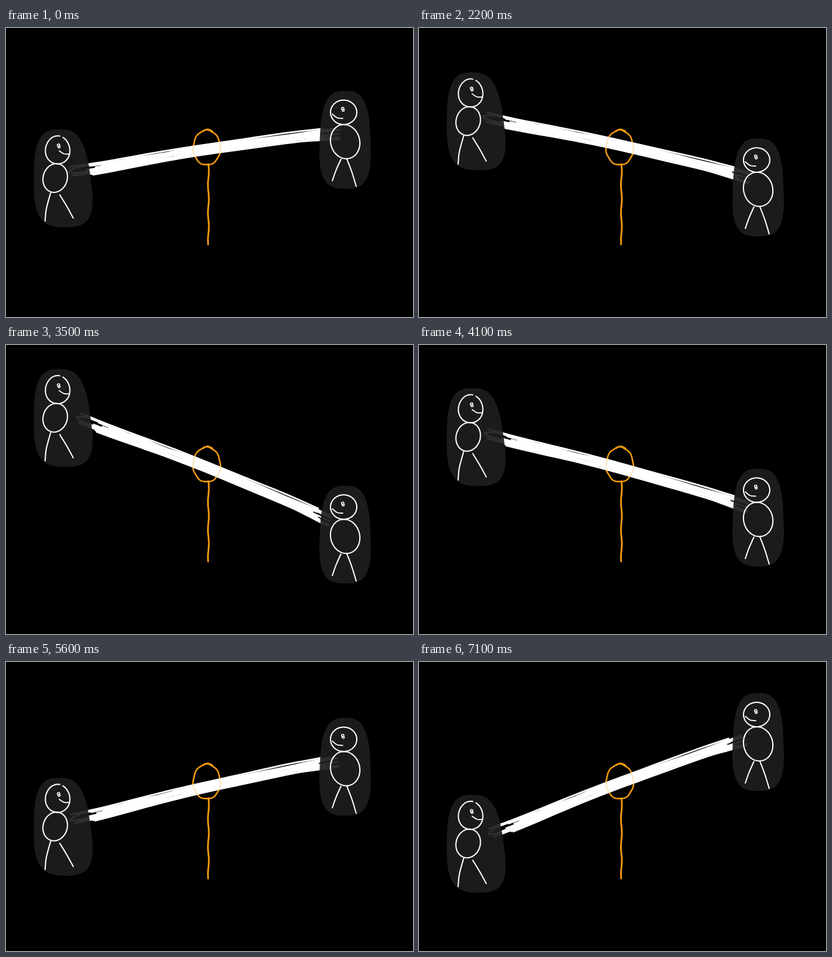
Recreate the animation shown at these times as an HTML page with a canvas. Size 666x473 px, loop 7800 ms.

```html
<!DOCTYPE html>
<html lang="en">
<head>
<meta charset="utf-8">
<title>Seesaw</title>
<style>
html, body { margin: 0; width: 100%; height: 100%; overflow: hidden; background: #000; }
canvas { display: block; }
</style>
</head>
<body>
<canvas id="stage" width="666" height="473"></canvas>
<script>
const ctx = document.getElementById('stage').getContext('2d');
const LOOP = 7800, TICK = 100;
const INK = '#fff', ORANGE = '#f79b10', SHADE = 'rgba(31,29,32,0.92)';
const PIVOT = { x: 326.5, y: 202 };

const mix = (a, b, k) => a + (b - a) * k;
const clamp = k => Math.max(0, Math.min(1, k));
const power = p => k => k ** p;
const swing = p => k => Math.sin(k ** p * Math.PI / 2);

// Tops of both figures at rest, then the phases of the ride.
// The motion rests on the ticks in PAUSES.
const REST = { left: 166, right: 103 };
const PAUSES = [12, 17, 23, 30, 38, 42, 48, 51, 52, 55, 58, 60, 66, 69, 70];
const PHASES = [
  { steps: 1, left: 164, right: 103, easeLeft: power(1), easeRight: power(1) },
  { steps: 18, left: 35, right: 234, easeLeft: swing(1), easeRight: swing(1.3) },
  { steps: 18, left: 205, right: 77, easeLeft: power(1.65), easeRight: power(1.7) },
  { steps: 9, left: 217.5, right: 51, easeLeft: power(0.9), easeRight: power(0.6) }
];

const LEFT = {
  blob: { x: 92, y: 246, rx: 46.5, ry: 80, lean: 5, taper: 0.12, square: 3 },
  head: { x: 84.5, y: 199.5, rx: 20, ry: 23, lean: 0, taper: 0.06, from: -1.1, sweep: 6 },
  body: { x: 80.5, y: 245.5, rx: 20, ry: 23.5, lean: -2 },
  eye: [86, 193],
  smile: [[87, 201], [95, 206], [104, 206]],
  legs: [[[73, 270], [66, 296], [64, 316]], [[88, 273], [99, 291], [110, 311]]]
};
const RIGHT = {
  blob: { x: 555, y: 183, rx: 41.5, ry: 80, taper: 0.08, square: 3 },
  head: { x: 552.5, y: 138, rx: 21.5, ry: 20 },
  body: { x: 555, y: 186, rx: 24, ry: 28, lean: 2 },
  eye: [551, 133],
  smile: [[534, 141], [542, 147], [551, 148]],
  legs: [[[548, 215], [540, 233], [534, 250]], [[558, 215], [566, 236], [573, 259]]]
};
const RING = { x: 328.5, y: 195.5, rx: 22.3, ry: 28.5, taper: 0.05, wobble: 0.5 };

// Oval points; square > 2 flattens the sides, taper widens the bottom
function oval({ x, y, rx, ry, lean = 0, taper = 0, square = 2, wobble = 0, from = 0, sweep = 2 * Math.PI }) {
  const bend = v => Math.sign(v) * Math.abs(v) ** (2 / square);
  return Array.from({ length: 61 }, (_, i) => {
    const a = from + sweep * i / 60, c = bend(Math.cos(a)), s = bend(Math.sin(a));
    const shake = wobble * Math.sin(7 * a);
    return [x + lean * s + (rx * (1 + taper * s) + shake) * c, y + (ry + shake) * s];
  });
}

// Smooth curve that ends in the first and last point
function trace(pts) {
  const last = pts.length - 1;
  ctx.beginPath();
  ctx.moveTo(...pts[0]);
  for (let i = 0; i < last; i++) {
    const a = pts[Math.max(0, i - 1)], b = pts[i], c = pts[i + 1], d = pts[Math.min(last, i + 2)];
    ctx.bezierCurveTo(
      b[0] + (c[0] - a[0]) / 6, b[1] + (c[1] - a[1]) / 6,
      c[0] - (d[0] - b[0]) / 6, c[1] - (d[1] - b[1]) / 6, ...c);
  }
}

function line(pts, color, width) {
  trace(pts);
  ctx.strokeStyle = color;
  ctx.lineWidth = width;
  ctx.stroke();
}

function random(seed) {
  return () => {
    seed = (seed * 16807) % 2147483647;
    return seed / 2147483647;
  };
}

// One pencil stroke along the plank; depth runs from -1 (upper edge) to 1
function strand(x0, x1, d0, d1, phase) {
  const n = 10;
  return Array.from({ length: n + 1 }, (_, i) => {
    const k = i / n, x = mix(x0, x1, k), u = x - PIVOT.x;
    const bow = 6 * Math.cos(Math.PI * u / 377) * (0.5 + u / 377);
    const depth = mix(d0, d1, k) + 0.08 * Math.sin(phase + i);
    return [x, 203 - 0.148 * u - bow + 9.2 * depth];
  });
}

function scribble() {
  const rnd = random(77), strands = [], n = 13;
  for (let i = 0; i < n; i++) {
    const d0 = 2 * i / (n - 1) - 1, d1 = 2 * (i * 5 % n) / (n - 1) - 1;
    strands.push(strand(mix(104, 158, rnd()), mix(512, 562, rnd()), d0, d1, 6 * rnd()));
  }
  // Shorter strokes fill the left half
  for (let i = 0; i < 6; i++) {
    strands.push(strand(mix(138, 205, rnd()), mix(310, 390, rnd()), mix(-1, 1, rnd()), mix(-0.8, 0.8, rnd()), i));
  }
  strands.push([[140, 224], [116, 228], [102, 236], [118, 237], [140, 233]]);
  return strands;
}
const PLANK = scribble();

function drawPlank(left, right) {
  const angle = d => Math.atan((0.82 * d - 4) / 377);
  ctx.save();
  ctx.translate(PIVOT.x, PIVOT.y + (left + right - REST.left - REST.right) / 2);
  ctx.rotate(angle(right - left) - angle(REST.right - REST.left));
  ctx.translate(-PIVOT.x, -PIVOT.y);
  PLANK.forEach(p => line(p, INK, 2.8));
  ctx.restore();
}

function drawRing() {
  line(oval(RING), ORANGE, 2.4);
  line([[323, 169], [330, 165.5], [338, 169]], ORANGE, 2.2);
}

function drawPole() {
  const pts = Array.from({ length: 14 }, (_, i) => [331.2 + 0.8 * Math.sin(i * 1.4), 223 + i * 10.1]);
  line(pts, ORANGE, 2.8);
}

function drawFigure(fig, dy) {
  ctx.save();
  ctx.translate(0, dy);
  trace(oval(fig.blob));
  ctx.fillStyle = SHADE;
  ctx.fill();
  line(oval(fig.head), INK, 2);
  line(oval(fig.body), INK, 2);
  line(fig.smile, INK, 1.8);
  fig.legs.forEach(leg => line(leg, INK, 2));
  const [x, y] = fig.eye;
  line(oval({ x, y: y - 1.3, rx: 2, ry: 1.8 }), INK, 1.6);
  line(oval({ x: x + 0.8, y: y + 1.7, rx: 1.8, ry: 1.5 }), INK, 1.6);
  ctx.restore();
}

// Number of moving ticks so far
function stepsAt(tick) {
  return Math.max(0, tick - 10 - PAUSES.filter(p => p <= tick).length);
}

function pose(tick) {
  let { left, right } = REST, done = stepsAt(tick);
  for (const phase of PHASES) {
    const k = clamp(done / phase.steps);
    left = mix(left, phase.left, phase.easeLeft(k));
    right = mix(right, phase.right, phase.easeRight(k));
    done -= phase.steps;
  }
  return [left, right];
}

function draw(time) {
  const [left, right] = pose(Math.floor(time % LOOP / TICK));
  ctx.fillStyle = '#000';
  ctx.fillRect(0, 0, 666, 473);
  ctx.lineCap = ctx.lineJoin = 'round';
  drawRing();
  drawPole();
  drawPlank(left, right);
  ctx.globalAlpha = 0.25;
  drawRing();
  ctx.globalAlpha = 1;
  drawFigure(LEFT, left - REST.left);
  drawFigure(RIGHT, right - REST.right);
}

const begin = performance.now();
function loop() {
  draw(performance.now() - begin);
  requestAnimationFrame(loop);
}
loop();
</script>
</body>
</html>
```
